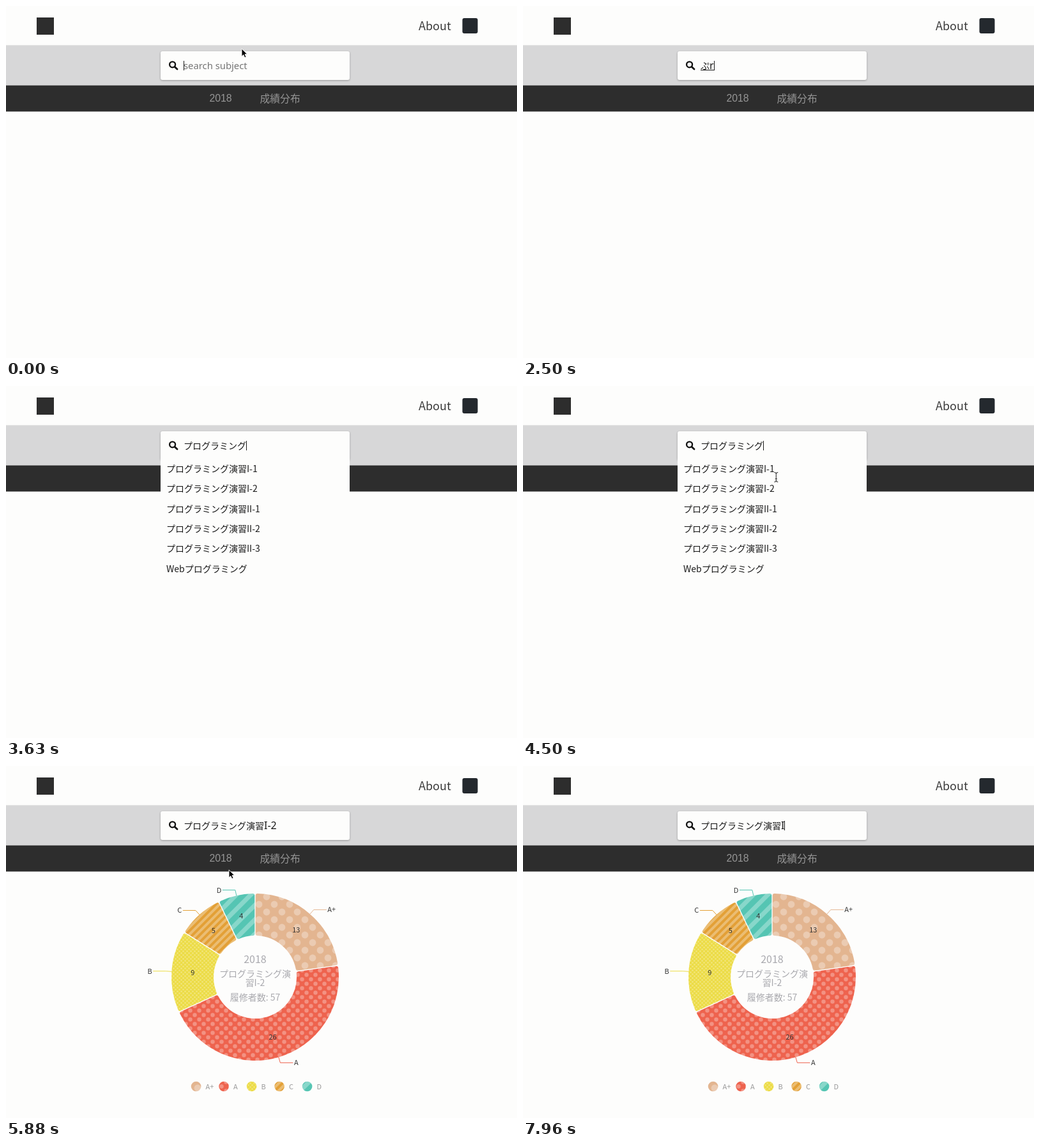
An HTML page that plays this animation: 800 px wide and 552 px high, repeating every 8000 ms.

```html
<!DOCTYPE html>
<html lang="ja">
<head>
<meta charset="utf-8">
<title>Subject search</title>
<style>
  html, body { margin: 0; width: 100%; height: 100%; overflow: hidden; background: #fdfdfc; }
  #stage { position: absolute; left: 0; top: 0; width: 800px; height: 552px; overflow: hidden; }
  svg { position: absolute; left: 0; top: 0; }
  text, #field { font-family: "Noto Sans CJK JP", "Noto Sans CJK", "Noto Sans", sans-serif; }
  .mid { text-anchor: middle; }
  .end { text-anchor: end; }
  #box {
    position: absolute; left: 242px; top: 71px; width: 296px; height: 45px;
    background: #fdfdfc; border-radius: 3px; box-shadow: 0 1px 3px rgba(0, 0, 0, .3);
  }
  #list { position: absolute; left: 242px; top: 113px; width: 296px; height: 190px; background: #fdfdfc; }
  #field {
    position: absolute; left: 278px; top: 82px; height: 22px; line-height: 22px;
    white-space: pre; font-size: 14px; color: #1a1a1a;
  }
  #field b { font: 16px/22px "Noto Sans", sans-serif; }
  #field b.hint { font-size: 14.8px; color: #757575; }
  #typed.composing { border-bottom: 1px solid #1a1a1a; display: inline-block; height: 18px; line-height: 22px; }
  #caret { position: absolute; top: 4px; width: 1px; height: 15px; background: #1a1a1a; }
</style>
</head>
<body>
<div id="stage">
  <svg width="800" height="552">
    <rect y="61" width="800" height="1" fill="#e8e8e8"/>
    <rect y="62" width="800" height="62.5" fill="#d7d7d8"/>
    <rect y="124.5" width="800" height="41" fill="#2d2d2d"/>
    <rect x="48" y="18" width="27" height="27" fill="#2d2d2d"/>
    <rect x="714.5" y="19" width="24" height="24" rx="3" fill="#24292e"/>
    <text x="646" y="37.5" font-size="18" fill="#3a3a3a">About</text>
    <g font-size="15.8" fill="#969696">
      <text x="318.5" y="150" style="font-family:'Liberation Sans',sans-serif">2018</text>
      <text x="397.5" y="150.5">成績分布</text>
    </g>
    <defs id="paints"></defs>
    <g id="chart"></g>
  </svg>
  <div id="box"></div>
  <div id="list"><svg id="rows" width="296" height="190"></svg></div>
  <svg width="800" height="552" fill="none" stroke="#101010">
    <circle cx="260.6" cy="91.8" r="4.5" stroke-width="2.3"/>
    <path d="M264 95.2L268 99" stroke-width="2.8" stroke-linecap="round"/>
  </svg>
  <div id="field"><span id="typed"></span><i id="caret"></i></div>
  <svg width="800" height="552">
    <path id="arrow" d="M0 0V12.2L2.8 9.6L4.8 14L7 13L5 8.7H8.8Z" fill="#000" stroke="#fff" stroke-width=".9"/>
    <path id="beam" d="M-3 -7.5Q0 -7.5 0 -5Q0 -7.5 3 -7.5M0 -5V5M-3 7.5Q0 7.5 0 5Q0 7.5 3 7.5M-1.5 2.5H1.5"
      fill="none" stroke="#333" stroke-width="1.1"/>
  </svg>
</div>
<script>
const $ = id => document.getElementById(id);
const LOOP = 8000;
const SUBJECT = 'プログラミング';
const CHOSEN = SUBJECT + '演習I-2';

// --- doughnut chart ---
const CX = 390, CY = 331, OUTER = 131, INNER = 65;
const PAD = .7 * Math.PI / 180;
const LIGHT = 'fill="#fff" fill-opacity=".3"';
// Staggered dots, two per tile
const dots = (size, r) => ({
  size, turn: 0, shift: 0,
  art: [size / 4, size * 3 / 4].map(c => `<circle cx="${c}" cy="${c}" r="${r}" ${LIGHT}/>`).join(''),
});
// Diagonal stripes, one of them centred on the origin
const stripes = (size, width) => ({
  size, turn: 45, shift: -width / 2,
  art: `<rect width="${width}" height="${size}" ${LIGHT}/>`,
});
const slices = [
  { name: 'A+', value: 13, base: '#e3b590', fill: dots(24, 5.4) },
  { name: 'A', value: 26, base: '#ee634e', fill: dots(14, 3.2) },
  { name: 'B', value: 9, base: '#ecdc47', fill: dots(6, 1.3) },
  { name: 'C', value: 5, base: '#e3a036', fill: stripes(8, 4) },
  { name: 'D', value: 4, base: '#55c5b3', fill: stripes(16, 7) },
];
const total = slices.reduce((sum, s) => sum + s.value, 0);
const unit = (2 * Math.PI - slices.length * PAD) / total;

const polar = (r, a) => [CX + r * Math.sin(a), CY - r * Math.cos(a)];
const label = (x, y, text, size, color, cls = '') =>
  `<text x="${x}" y="${y}" font-size="${size}" fill="${color}" class="${cls}">${text}</text>`;

// A sector inset on all sides; the round-joined stroke grows it back with soft corners.
function sector(from, to, inset) {
  const big = OUTER - inset, small = INNER + inset;
  const corner = (r, a, side) => polar(r, a + side * Math.asin((inset + .7) / r)).join(' ');
  const large = to - from > Math.PI ? 1 : 0;
  return `M${corner(big, from, 1)}A${big} ${big} 0 ${large} 1 ${corner(big, to, -1)}` +
    `L${corner(small, to, -1)}A${small} ${small} 0 ${large} 0 ${corner(small, from, 1)}Z`;
}

function buildChart() {
  let angle = 0, paints = '', shapes = '', notes = '';
  slices.forEach(({ name, value, base, fill }, i) => {
    const paint = `url(#paint${i})`;
    const end = angle + value * unit + PAD, mid = (angle + end) / 2;
    paints += `<pattern id="paint${i}" patternUnits="userSpaceOnUse" width="${fill.size}" height="${fill.size}"
      patternTransform="translate(${CX} ${CY}) rotate(${fill.turn}) translate(${fill.shift})">
      <rect width="${fill.size}" height="${fill.size}" fill="${base}"/>${fill.art}</pattern>`;
    shapes += `<path d="${sector(angle, end, 3)}" fill="${paint}" stroke="${paint}"
      stroke-width="6" stroke-linejoin="round"/>`;

    const side = Math.sin(mid) > 0 ? 1 : -1;
    const [x, y] = polar(140, mid), [nx, ny] = polar(98, mid);
    notes += `<path d="M${polar(OUTER, mid).join(' ')}L${x} ${y}h${side * 20}" fill="none" stroke="${base}"/>`;
    notes += label(x + side * 21.5, y + 4, name, 11, '#333', side < 0 ? 'end' : '');
    notes += label(nx, ny + 4, value, 11, '#333', 'mid');

    const lx = 297.6 + 43.5 * i;
    notes += `<circle cx="${lx}" cy="502.5" r="7.8" fill="${paint}"/>`;
    notes += label(lx + 15, 506.5, name, 11, '#999');
    angle = end;
  });
  [['2018', 308.5, 16], ['プログラミング演', 330.5, 14], ['習I-2', 345, 14], ['履修者数: 57', 367.5, 14]]
    .forEach(([text, y, size]) => { notes += label(CX, y, text, size, '#a9a9ae', 'mid'); });
  $('paints').innerHTML = paints;
  $('chart').innerHTML = shapes + notes;
}

const subjects = ['I-1', 'I-2', 'II-1', 'II-2', 'II-3'].map(n => SUBJECT + '演習' + n).concat('Web' + SUBJECT);
$('rows').innerHTML = subjects.map((s, i) => label(9, 21.8 + i * 31.35, s, 14, '#1a1a1a')).join('');
buildChart();

// --- timeline ---
const OPEN = 3230, PICK = 5620, REFOCUS = 7300;
// [time, text, composing]
const typing = [
  [0, ''], [1130, 'p', true], [1960, 'ぷ', true], [2440, 'ぷr', true], [2600, 'ぷろ', true],
  [2960, SUBJECT, true], [OPEN, SUBJECT], [PICK, CHOSEN], [REFOCUS, CHOSEN],
  [7800, CHOSEN.slice(0, -1)], [7955, CHOSEN.slice(0, -2)],
];
// [time, x, y, shape]; the pointer glides to the next row, a row without a shape hides it
const pointer = [
  [0, 369, 67, 'arrow'], [40, 369, 67, 'arrow'], [170, 370, 77, 'beam'], [330, 370, 94, 'beam'],
  [1130, 370, 94], [4150, 370, 94, 'beam'], [4600, 400, 150, 'beam'], [4900, 395, 205, 'beam'],
  [5250, 349, 165, 'beam'], [PICK, 349, 165, 'arrow'], [6200, 349, 160, 'arrow'],
  [6500, 357, 162, 'arrow'], [6700, 357, 162, 'arrow'], [6960, 400, 116, 'beam'],
  [7200, 434, 95, 'beam'], [7800, 434, 95],
];
const indexAt = (rows, t) => rows.findLastIndex(row => row[0] <= t);
const show = (el, on) => { el.style.visibility = on ? 'visible' : 'hidden'; };

function drawPointer(t) {
  const i = indexAt(pointer, t);
  const [start, x, y, shape] = pointer[i];
  const [stop, x2, y2] = pointer[i + 1] || [LOOP, x, y];
  const p = (t - start) / (stop - start), k = p * p * (3 - 2 * p);
  for (const id of ['arrow', 'beam']) {
    show($(id), id === shape);
    $(id).setAttribute('transform', `translate(${x + (x2 - x) * k} ${y + (y2 - y) * k})`);
  }
}

let shown = -1;
function drawField(t) {
  const i = indexAt(typing, t);
  const [since, text, composing] = typing[i];
  if (i !== shown) {
    shown = i;
    $('typed').innerHTML = text ? text.replace(/[\x21-\x7e]+/g, '<b>$&</b>') : '<b class="hint">search subject</b>';
    $('typed').className = composing ? 'composing' : '';
    $('caret').style.left = (text ? $('typed').offsetWidth : 0) + 'px';
  }
  const focused = t < PICK || t >= REFOCUS;
  const lit = text ? (t - since) % 1000 < 500 : t < 880;
  show($('caret'), focused && lit);
}

function frame(now) {
  const t = now % LOOP;
  drawField(t);
  drawPointer(t);
  show($('list'), t >= OPEN && t < PICK);
  show($('chart'), t >= PICK);
  requestAnimationFrame(frame);
}
frame(0);
</script>
</body>
</html>
```
